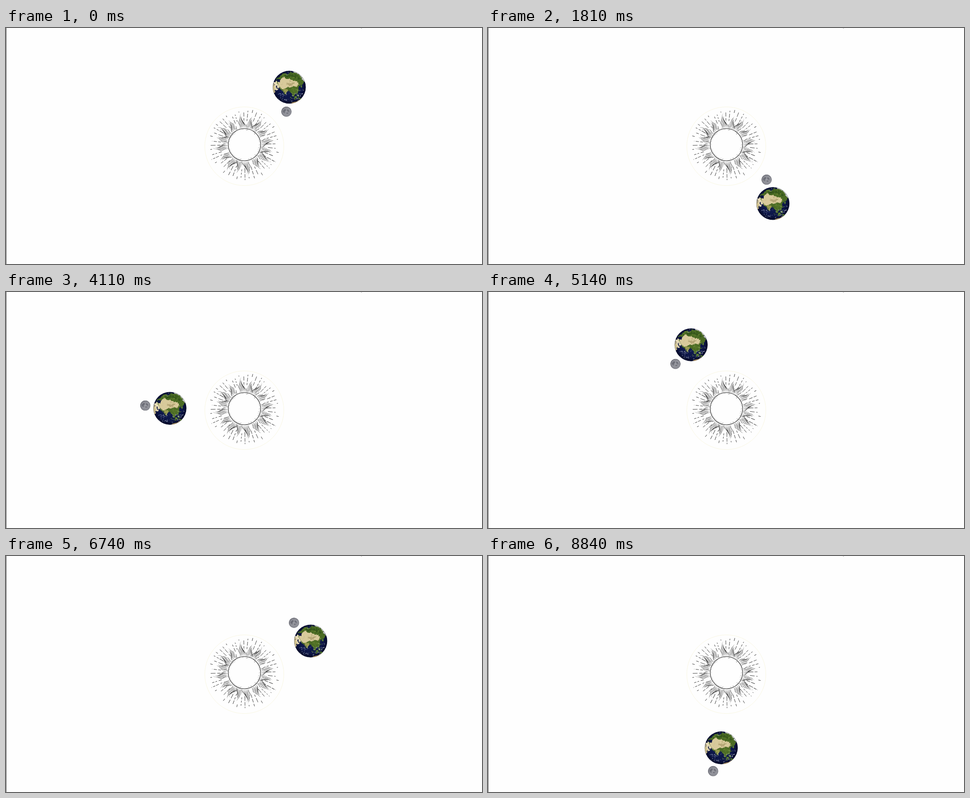
Animation, 1060 px wide and 528 px high, one loop 8880 ms. Source, as an HTML page:

```html
<!DOCTYPE html>
<html lang="en">
<head>
<meta charset="utf-8">
<title>Sun, Earth and Moon</title>
<style>
  html, body { margin: 0; width: 100%; height: 100%; overflow: hidden; background: #fefefe; }
  svg { display: block; width: 100vw; height: 100vh; }
</style>
</head>
<body>
<svg viewBox="0 0 1060 528">
  <defs>
    <clipPath id="globe"><circle r="36.8"/></clipPath>
    <clipPath id="moonDisc"><circle r="11.5"/></clipPath>
    <radialGradient id="sea" cx=".5" cy=".48" r=".52">
      <stop offset="0" stop-color="#17235a"/>
      <stop offset=".75" stop-color="#0b1445"/>
      <stop offset="1" stop-color="#050a26"/>
    </radialGradient>
    <radialGradient id="rock" cx=".52" cy=".52" r=".52">
      <stop offset="0" stop-color="#9d9ea5"/>
      <stop offset=".8" stop-color="#8b8c94"/>
      <stop offset="1" stop-color="#62636c"/>
    </radialGradient>
    <filter id="ragged" x="-40" y="-40" width="80" height="80" filterUnits="userSpaceOnUse" color-interpolation-filters="sRGB">
      <feTurbulence type="fractalNoise" baseFrequency=".16" numOctaves="3" seed="4"/>
      <feDisplacementMap in="SourceGraphic" scale="9" xChannelSelector="R" yChannelSelector="G"/>
    </filter>
  </defs>

  <path d="M.5 0V528" stroke="#555"/>
  <path d="M790.5 0h2" stroke="#444"/>

  <circle cx="530.7" cy="264.5" r="88" fill="none" stroke="#f5f2d6" stroke-width=".7"/>
  <g transform="translate(531 261)">
    <g id="rays" stroke="#333" stroke-width=".9"/>
    <g id="flames" fill="#222"/>
    <circle r="36" fill="#fefefe" stroke="#1c1c1c" stroke-width="1.1"/>
    <g id="hatching" stroke="#666" stroke-width=".6"/>
  </g>

  <g id="earth">
    <g clip-path="url(#globe)">
      <circle r="36.8" fill="url(#sea)"/>
      <g filter="url(#ragged)">
        <path fill="#4b6b24" d="M-27-21L-19-27-10-31 0-31 10-34 20-31 26-25 32-14 29-6 25-5 22 1 24 8 20 13 14 14 12 14 11 21 7 20 4 14 0 9-4 8-8 16-12 15-14 7-21 4-25-5-29-12Z"/>
        <path fill="#36581c" d="M-15-27L0-29 18-27 25-19 15-18 4-23-8-22Z"/>
        <path fill="#d8ca9b" d="M-25-10L-21-17-13-21-5-18 2-20 9-15 17-13 22-7 15-3 7-1 2 1-4-1-9 3-14 5-20 2-24-3Z"/>
        <path fill="#b9aa7a" d="M-8-8L0-11 12-9 6-4-3-4Z"/>
        <path fill="#989a50" d="M-14 5L-7 3-3 8-8 16-12 13Z"/>
        <path fill="#e8dcb6" d="M-33-11L-28-13-23-1-24 5-30 7-33 0Z"/>
        <path fill="#d3c48f" d="M-39-8L-35-11-32 2-31 9-34 14-39 9Z"/>
        <path fill="#0c1540" d="M-29-15L-24-19-21-20-20-17-23-11-26-11ZM-29-5L-27-4-25 4-28 3Z"/>
        <path fill="#5c8130" d="M1 22L7 26 4 28ZM10 23L15 21 17 25 12 27ZM19 25L26 24 29 27 22 28ZM17 16L20 16 21 21 18 21ZM26-6L30-2 27 3 25 0Z"/>
        <path fill="#e9eae2" d="M6-37L15-32 23-27 29-20 33-13 36-20 26-34 14-40Z"/>
        <g id="texture"/>
      </g>
      <path fill="#cda866" d="M4 35L11 33 16 32 21 29 26 27 22 35 10 39Z"/>
    </g>
    <circle r="36.4" fill="none" stroke="#09102c" stroke-opacity=".5" stroke-width=".7"/>
  </g>

  <g id="moon">
    <g clip-path="url(#moonDisc)">
      <circle r="11.5" fill="url(#rock)"/>
      <path fill="#5c5d67" opacity=".7" d="M-8-1L-6-5-2-6-1-3-3 0-2 3-6 3ZM1-4L4-5 7-2 5 1 2 0ZM-1 2L3 2 4 4 1 5Z"/>
      <g id="craters"/>
    </g>
  </g>
</svg>
<script>
const $ = id => document.getElementById(id);

let seed = 7;
const random = (min = 0, max = 1) => {
  seed = (seed * 16807) % 2147483647;
  return min + (max - min) * seed / 2147483647;
};

// A stroke with an S-bend that tapers to a point at both ends.
const blade = (x0, y0, x1, y1, bend, half) => {
  const ya = y0 + (y1 - y0) * .4, yb = y0 + (y1 - y0) * .7;
  const side = w => [x0 + bend + w, ya, x1 - bend + w, yb];
  const [a, b, c, d] = side(half), [e, f, g, h] = side(-half);
  return `M${x0} ${y0}C${a} ${b} ${c} ${d} ${x1} ${y1}C${g} ${h} ${e} ${f} ${x0} ${y0}Z`;
};
const turned = (angle, d) => `<path transform="rotate(${angle})" d="${d}"/>`;

function drawSun() {
  let rays = '', flames = '', hatching = '';
  for (let i = 0; i < 48; i++) {
    const angle = -9 + i * 7.5, overFlame = i % 3 === 0;
    let d = '', r = overFlame ? 73 : random(48, 56);
    const end = overFlame ? random(75, 80) : random(68, 81);
    while (r < end) {
      const next = Math.min(end, r + random(3, 11));
      d += `M0 ${-r}V${-next}`;
      r = next + random(2, 4);
    }
    rays += turned(angle + random(-1, 1), d);
  }
  // Each flame is a tuft of wavy strands, tallest in the middle.
  for (let i = 0; i < 16; i++) {
    const large = i % 2 === 0;
    const height = large ? 71 : 66, bend = (i % 4 < 2 ? 1 : -1) * (large ? 10 : 8);
    let d = '';
    for (let k = -3; k <= 3; k++) {
      const drop = Math.abs(k) * random(4, 7);
      d += blade(k * 2.1, -36, k * 1.9 + bend * .4, -height + drop, bend, k % 2 ? .6 : .42);
    }
    flames += turned(-9 + i * 22.5, d);
  }
  for (let i = 0; i < 44; i++) {
    const start = random(31.5, 34.5);
    hatching += turned(random(0, 360), `M0 ${-start}l${random(-2, 2)} ${-random(.5, 1.5)}`);
  }
  $('rays').innerHTML = rays;
  $('flames').innerHTML = flames;
  $('hatching').innerHTML = hatching;
}

function specks(count, color, [x0, x1], [y0, y1], size, opacity) {
  let out = '';
  for (let i = 0; i < count; i++) {
    const x = random(x0, x1), y = random(y0, y1);
    out += `<ellipse cx="${x}" cy="${y}" rx="${random(.4, size)}" ry="${random(.3, size * .6)}" ` +
      `fill="${color}" opacity="${opacity}" transform="rotate(${random(-40, 40)} ${x} ${y})"/>`;
  }
  return out;
}

drawSun();
$('texture').innerHTML =
  specks(40, '#2f4d18', [-16, 25], [-30, -20], 2, .5) +
  specks(22, '#7f9a3c', [-15, 24], [-28, -19], 2, .6) +
  specks(26, '#8f8650', [-20, 17], [-15, 2], 1.6, .45) +
  specks(24, '#75923a', [3, 20], [0, 13], 1.8, .6) +
  specks(48, '#c9d2df', [-26, 30], [13, 31], 2, .5) +
  specks(14, '#e8edf0', [16, 33], [3, 20], 2, .5) +
  specks(12, '#e4e8e4', [-14, 24], [-36, -28], 1.6, .55);
$('craters').innerHTML =
  specks(18, '#bcbdc4', [-7, 10], [-8, 10], 1.3, .5) +
  specks(16, '#55565f', [-9, 7], [-9, 7], 1.1, .4);

// The picture advances in held steps: [steps since the previous mark, time in ms].
const LOOP = 8880;
const marks = [
  [1, 40], [11, 870], [1, 980], [11, 1810], [1, 1860], [1, 1910], [11, 2760], [1, 2840],
  [4, 3120], [1, 3220], [7, 3690], [1, 3790], [12, 4670], [1, 4770], [5, 5140], [1, 5240],
  [5, 5600], [1, 5660], [12, 6540], [1, 6590], [2, 6740], [1, 6820], [8, 7390], [1, 7490],
  [1, 7570], [10, 8320], [1, 8380], [6, 8840], [1, LOOP]
];
const stepTimes = [0];
for (const [steps, end] of marks) {
  const start = stepTimes.at(-1);
  for (let i = 1; i <= steps; i++) stepTimes.push(start + (end - start) * i / steps);
}

const place = (id, x, y) => $(id).setAttribute('transform', `translate(${x} ${y})`);

function render() {
  const now = performance.now() % LOOP;
  const held = stepTimes.findLast(time => time <= now);
  const angle = 5.364 + held / 1000;
  const x = 530.5 + 165.5 * Math.cos(angle), y = 264 + 165.5 * Math.sin(angle);
  place('earth', x, y);
  place('moon', x + 55.2 * Math.cos(5 * angle), y + 55.2 * Math.sin(5 * angle));
  requestAnimationFrame(render);
}
render();
</script>
</body>
</html>
```
